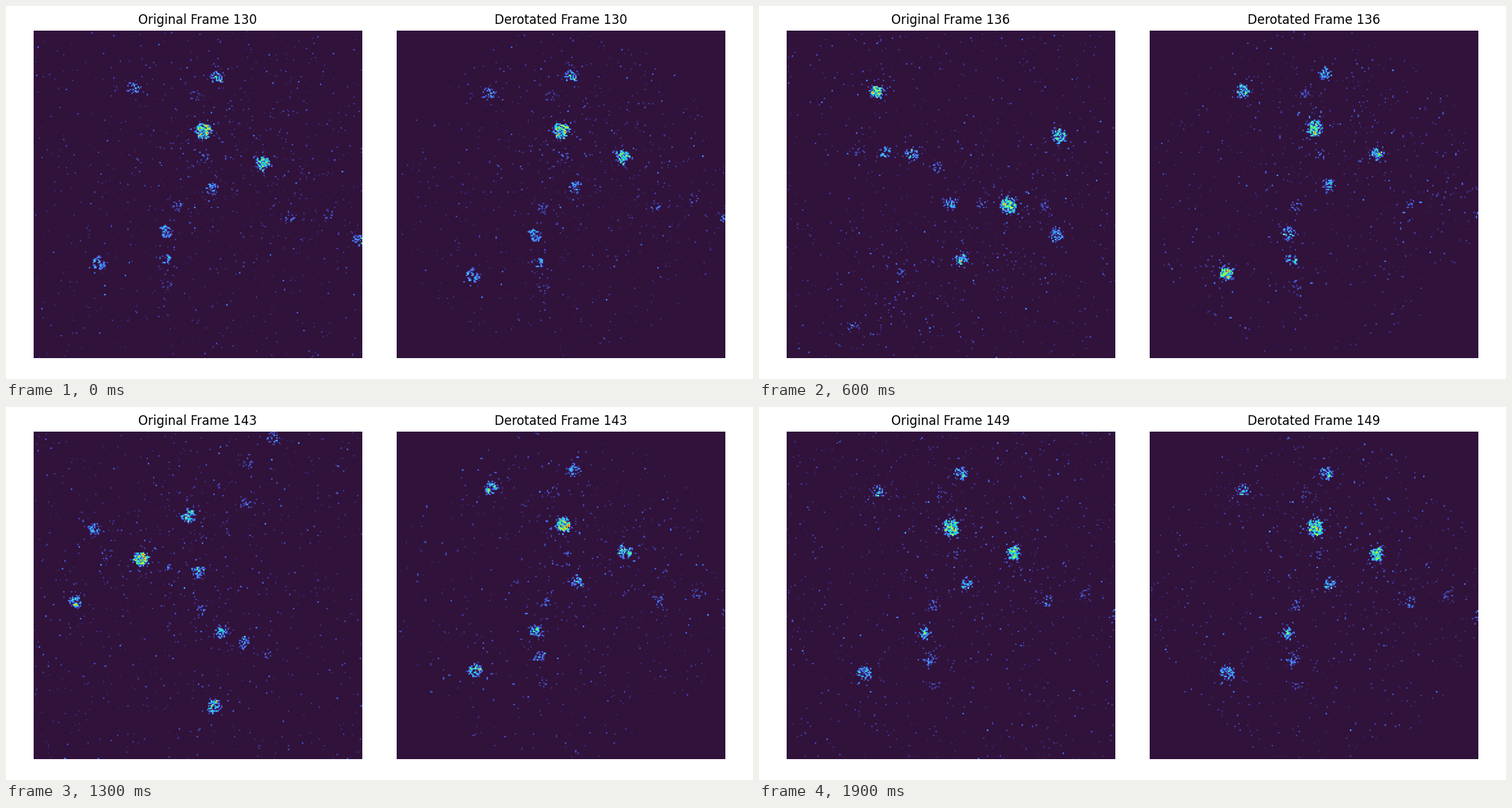
A matplotlib script for the animation above (2 s loop, 1000x500 px).

```python
import numpy as np
import matplotlib.pyplot as plt
from matplotlib.animation import FuncAnimation

FIRST, COUNT, STEP_MS = 130, 20, 100
SIZE, GRID = 440, 256          # panel side in stage pixels, image side in samples
AXIS_Y = -7.5                  # height of the rotation axis above the panel's middle
TURN_START, TURN_STEPS = -3.4, 24

# Cells of the sample: x, y, brightness
CELLS = [
    (14, -157, 0.20), (-96, -134, 0.24), (0, -84, 0.40), (83, -49, 0.26),
    (19, -9, 0.19), (-25, 20, 0.10), (-36, 57, 0.22), (-31, 92, 0.15),
    (-118, 110, 0.29), (127, 17, 0.08), (177, 8, 0.04), (-25, 126, 0.06),
    (6, -49, 0.06), (-14, -130, 0.05), (222, 34, 0.10),
]

side = (np.arange(GRID) + 0.5) * SIZE / GRID - SIZE / 2
X, Y = np.meshgrid(side, side)


def turn(n):
    """One full turn with a smooth start and stop: angle, and speed per step."""
    phase = 2 * np.pi * (n - TURN_START) / TURN_STEPS
    return phase - np.sin(phase), 2 * np.pi / TURN_STEPS * (1 - np.cos(phase))


def row_angle(n, y):
    """The sample keeps turning while the rows are scanned."""
    angle, speed = turn(n)
    return angle + speed * y / SIZE


def rotate(x, y, a):
    y = y - AXIS_Y
    return np.cos(a) * x - np.sin(a) * y, np.sin(a) * x + np.cos(a) * y + AXIS_Y


def haze(x, y, cx, cy, spread):
    return np.exp(-((x - cx) ** 2 + (y - cy) ** 2) / (2 * spread ** 2))


def scan(n):
    """One noisy line scan of the turning sample."""
    rng = np.random.default_rng(500 + n)
    x, y = rotate(X, Y, -row_angle(n, Y))
    bob = 5 * (1 - np.cos(2 * np.pi * (n - 7.9) / 8.6))
    x, y = x - 0.3 * bob, y + bob

    tissue = haze(x, y, 100, -50, 75) + 0.7 * haze(x, y, 0, -60, 90)
    lit = rng.random(X.shape) < 0.012 + 0.012 * tissue
    image = lit * (0.015 + 0.04 * rng.exponential(size=X.shape))

    tilt = 0.6 * np.cos(turn(n)[0]) / (SIZE / 2)
    for cx, cy, glow in CELLS:
        amp = glow * (1 + tilt * cx)
        d = np.hypot(x - cx, y - cy) / (7 + 9 * glow)
        body = np.exp(-d ** 6)
        chance = min(0.78, 0.1 + 1.9 * amp) * (body + 0.05 * np.exp(-d * d / 4))
        lit = rng.random(X.shape) < chance
        level = 0.05 + amp * (0.2 + 0.8 * body) * rng.gamma(2.5, 0.4, X.shape)
        image = np.maximum(image, lit * level)
    return np.minimum(image, 0.95)


def derotate(image, n):
    """Put every sample back where it was before the turn."""
    y = Y
    for _ in range(8):
        x, y = rotate(X, Y, row_angle(n, y))
    col = np.floor((x + SIZE / 2) * GRID / SIZE).astype(int)
    row = np.floor((y + SIZE / 2) * GRID / SIZE).astype(int)
    inside = (col >= 0) & (col < GRID) & (row >= 0) & (row < GRID)
    inside &= np.hypot(X, Y) < SIZE / 2 + 2
    back = image[row.clip(0, GRID - 1), col.clip(0, GRID - 1)]
    return np.where(inside, back, 0)


scans = [scan(n) for n in range(COUNT)]
pairs = [(s, derotate(s, n)) for n, s in enumerate(scans)]

plt.rcParams["font.family"] = "DejaVu Sans"
fig = plt.figure(figsize=(10, 5), dpi=100, facecolor="white")
panels = []
for left, label in ((37, "Original"), (523.2, "Derotated")):
    ax = fig.add_axes([left / 1000, 28 / 500, 439.5 / 1000, 439.5 / 500])
    ax.axis("off")
    picture = ax.imshow(np.zeros((GRID, GRID)), cmap="turbo", vmin=0, vmax=1,
                        aspect="auto")
    panels.append((picture, ax.set_title("", fontsize=12), label))


def draw(n):
    for (picture, title, label), image in zip(panels, pairs[n]):
        picture.set_data(image)
        title.set_text(f"{label} Frame {FIRST + n}")


anim = FuncAnimation(fig, draw, frames=COUNT, interval=STEP_MS, repeat=True,
                     repeat_delay=0, init_func=lambda: draw(0))
plt.show()
```
